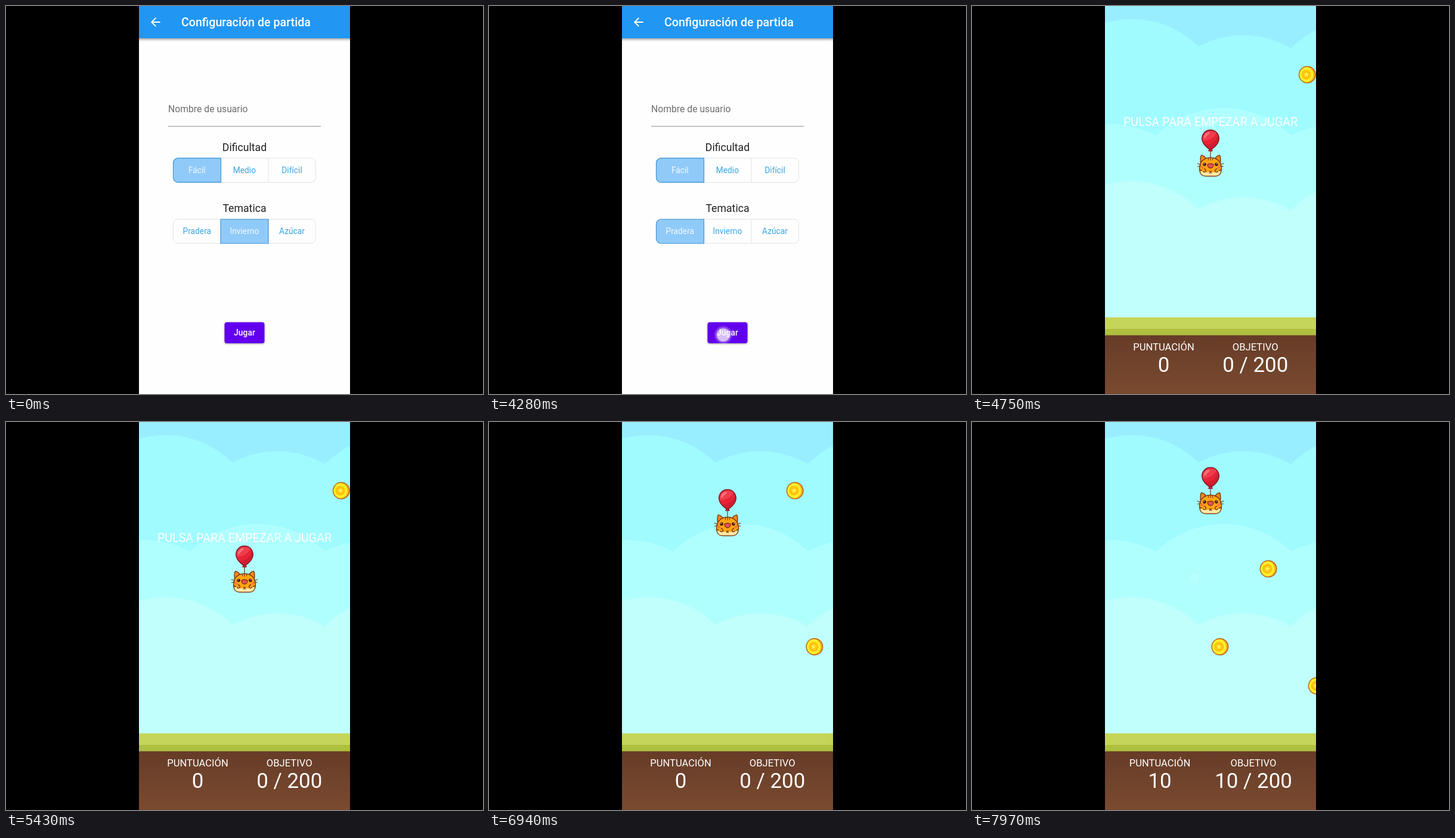
An HTML page for the animation above (8 s loop, 800x650 px).

```html
<!DOCTYPE html>
<html lang="es">
<head>
<meta charset="utf-8">
<style>
  html, body { margin: 0; width: 100%; height: 100%; overflow: hidden; background: #000; }
  svg { display: block; }
  text { font-family: Roboto, sans-serif; text-anchor: middle; }
  .body { font-size: 17.7px; fill: #212121; }
  .small { font-size: 13.77px; }
  .label { font-size: 16.6px; fill: #fff; }
  .score { font-size: 34.9px; fill: #fff; }
</style>
</head>
<body>
<svg id="stage" width="100%" height="100%" viewBox="0 0 800 650"></svg>
<script>
const LOOP = 8000;
const CX = 400, CY = 325;

const text = (s, x, y, attrs = '') => `<text x="${x}" y="${y}" ${attrs}>${s}</text>`;
// Full-width band of the phone screen.
const band = (y, h, fill) => `<rect x="223" y="${y}" width="354" height="${h}" fill="${fill}"/>`;

// Segmented control: plain cells plus one highlight layer per cell.
function toggleRow(id, y, labels) {
  const h = 40.5, base = y + 25.2;
  const mid = i => 320.3 + i * 79.6;
  const cell = i => i
    ? `M360 ${y}h80v${h}h-80z`
    : `M288.5 ${y}H360.5v${h}H288.5a8 8 0 0 1-8-8v-${h - 16}a8 8 0 0 1 8-8z`;
  const plain = labels.map((s, i) => text(s, mid(i), base, 'class="small" fill="#3ba5e3"')).join('');
  const lit = labels.slice(0, 2).map((s, i) => `<g id="${id}${i}">
    <path d="${cell(i)}" fill="#90caf9" stroke="#3b92d4" stroke-width="1.1"/>
    ${text(s, mid(i), base, 'class="small" fill="#f2f9ff"')}</g>`).join('');
  return `<rect x="280.5" y="${y}" width="239" height="${h}" rx="8" fill="none" stroke="#e0e3e6"/>
    <path d="M360.5 ${y}v${h}M440 ${y}v${h}" stroke="#e0e3e6"/>${plain}${lit}`;
}

const menu = `
  ${band(0, 650, '#fefefe')}
  <rect x="213" y="-10" width="374" height="64" fill="#2196f3" style="filter:drop-shadow(0 2px 2px #0006)"/>
  <path d="M20 11H7.83l5.59-5.59L12 4l-8 8 8 8 1.41-1.41L7.83 13H20z" fill="#fff"
    transform="translate(238.9 15.2) scale(.983)"/>
  ${text('Configuración de partida', 402.4, 34.2, 'font-size="19.67" font-weight="500" fill="#fff"')}
  ${text('Nombre de usuario', 338.8, 177.6, 'font-size="15.73" fill="#6e6e6e"')}
  <path d="M272 201.5h256" stroke="#929292"/>
  ${text('Dificultad', 400, 242.7, 'class="body"')}
  ${toggleRow('level', 254.9, ['Fácil', 'Medio', 'Difícil'])}
  ${text('Tematica', 400, 344.9, 'class="body"')}
  ${toggleRow('theme', 357.2, ['Pradera', 'Invierno', 'Azúcar'])}
  <circle id="inkTheme" cx="318" cy="380" fill="#2196f3" clip-path="url(#themeClip)"/>
  <rect x="366.5" y="529.7" width="67" height="35.3" rx="4" fill="#6200ee"
    style="filter:drop-shadow(0 1.5px 1.5px #0006)"/>
  <circle id="inkPlay" cx="393" cy="551" fill="#fff" clip-path="url(#playClip)"/>
  ${text('Jugar', 400, 552.4, 'class="small" font-weight="500" letter-spacing=".1" fill="#fff"')}`;

// One cloud layer: overlapping discs over a filled base.
const clouds = (fill, r, base, peaks) => `<g fill="${fill}">
  ${peaks.map(([x, y]) => `<circle cx="${x}" cy="${y + r}" r="${r}"/>`).join('')}
  ${band(base, 560 - base, fill)}</g>`;
const wave = y => [[268, y], [455, y + 27], [648, y + 1]];

const scenery = `
  ${band(-60, 710, '#98eeff')}
  ${clouds('#a0fbff', 158, 76, wave(22))}
  ${clouds('#b0ffff', 162, 222, [[232, 198], [422, 171], [608, 199]])}
  ${clouds('#c1fffc', 158, 347, wave(293.7))}
  ${band(521.5, 21, '#c5d559')}
  ${band(541, 12, '#afbf3f')}
  ${band(551.6, 120, 'url(#soil)')}
  <g id="hint">${text('PULSA PARA EMPEZAR A JUGAR', 400, 200.6, 'font-size="19.67" fill="#fff"')}</g>
  <g id="left">${text('PUNTUACIÓN', 0, 577, 'class="label"')}${text('0', 0, 612.7, 'class="score" id="points"')}</g>
  <g id="right">${text('OBJETIVO', 0, 577, 'class="label"')}${text('0 / 200', 0, 612.7, 'class="score" id="goal"')}</g>`;

const star = Array.from({ length: 10 }, (_, i) => {
  const r = i % 2 ? 2.3 : 5, a = i * Math.PI / 5 - Math.PI / 2;
  return `${(-1.6 + r * Math.cos(a)).toFixed(1)},${(r * Math.sin(a)).toFixed(1)}`;
}).join(' ');
const coin = `
  <circle r="13.6" fill="#ffb81c" stroke="#c06d1a" stroke-width="1.8"/>
  <ellipse cx="-1.4" rx="11.4" ry="12.5" fill="#fff02c"/>
  <circle cx="-1.6" r="8.2" fill="#ffc40c"/>
  <polygon points="${star}" fill="#fff056"/>`;

// Left half of a symmetric detail and its mirror image.
const pair = s => `${s}<g transform="translate(800) scale(-1 1)">${s}</g>`;
const cat = `
  <path d="M400 243v11" stroke="#6b3528" stroke-width="1.2"/>
  <path d="M400 207.8c8.3 0 14.2 6.2 14.2 14.3 0 7.500-7 14.600-12.200 17.400h-4c-5.200-2.800-12.200-9.900-12.200-17.400 0-8.100 5.900-14.300 14.200-14.300z"
    fill="#e62436" stroke="#7d1420" stroke-width="1.5"/>
  <path d="M387 226c-2-9 5-17 13-17 5 0 8 1.500 10 4-4 8-12 12-23 13z" fill="#f03c4c"/>
  <path d="M412.500 217c2 9-4 17-11 21.500h-3c-3-1.500-5-3.500-7-6 10 1 18-6 21-15.500z" fill="#d21d30"/>
  <path d="M389 221c0-6 4-9.500 9-10 2 4-3 5-5 8-1 2-3 4-4 2z" fill="#ff6d78"/>
  <path d="M398 239.500h4l1.300 3.500h-6.600z" fill="#d41f30" stroke="#7d1420"/>
  <g stroke="#7c3510" stroke-width="1.4" stroke-linejoin="round" stroke-linecap="round" fill="none">
    ${pair('<path d="M383.500 263c-.6-5-.4-10 1-13 4 .5 6.500 3 8.500 6.500z" fill="#f08a1c"/>')}
    <path d="M381.600 272c0-10.500 7-18 18.400-18s18.400 7.500 18.400 18c0 9.500-4.500 13-11 13h-14.800c-6.500 0-11-3.500-11-13z" fill="#ffa514"/>
    <path d="M383 277c5-1.500 8 .5 10 1.500h14c2-1 5-3 10-1.500-1 5.500-4.500 7.300-9.500 7.300h-15c-5 0-8.500-1.800-9.500-7.300z" fill="#ffe9a6" stroke="none"/>
    ${pair(`<path d="M382 274.500l3.500 1M389.500 272.500q4 2 2.500 5-2.500 1.800-4.500-.5"/>
      <path d="M378 264l6 1.500M378.500 269l5.500-1M396.500 255.500v2.500" stroke-width="1.100"/>`)}
    <path d="M400 255v3.500" stroke-width="1.100"/>
    <path d="M395 265.500q5-3 10 0c0 8-10 8-10 0z" fill="#e8505f"/>
    <path d="M398.500 276.800l3 3M401.500 276.800l-3 3"/>
  </g>
  ${pair(`<circle cx="386.200" cy="270.500" r="2.300" fill="#ff7440"/>
    <circle cx="390" cy="265.300" r="2.800" fill="#4b1a12"/>
    <circle cx="389.300" cy="264.300" r=".8" fill="#fff"/>`)}`;

// x at time t0, height on screen, time it is collected
const PLAY = 6552, SPEED = 0.1262, SCORED = 7740;
const coins = [
  { x: 562.3, y: 115, t0: PLAY, end: SCORED },
  { x: 546, y: 376.5, t0: 6940 },
  { x: 497.2, y: 246, t0: 7970 },
  { x: 578.3, y: 442, t0: 7970 }
];

document.getElementById('stage').innerHTML = `
  <defs>
    <linearGradient id="soil" x2="0" y2="1"><stop stop-color="#663c28"/><stop offset=".82" stop-color="#7a4a2f"/></linearGradient>
    <radialGradient id="glow"><stop offset=".6" stop-color="#fff" stop-opacity="0"/>
      <stop offset=".66" stop-color="#fff" stop-opacity=".45"/><stop offset="1" stop-color="#fff" stop-opacity="0"/></radialGradient>
    <clipPath id="themeClip"><rect x="281" y="357.7" width="79" height="39.5" rx="7"/></clipPath>
    <clipPath id="playClip"><rect x="366.5" y="529.7" width="67" height="35.3" rx="4"/></clipPath>
  </defs>
  <rect width="800" height="650"/>
  <svg x="223" width="354" height="650" viewBox="223 0 354 650">
    <g id="menu">${menu}</g>
    <rect id="scrim" x="223" width="354" height="650"/>
    <g id="game">
      ${band(-60, 770, '#fefefe')}
      <g id="scenery">${scenery}</g>
      ${coins.map((_, i) => `<g id="coin${i}">${coin}</g>`).join('')}
      <g id="cat">${cat}</g>
    </g>
    <g id="touch">
      <g id="disc"><circle r="16" fill="url(#glow)"/><circle r="10.8" fill="#fff" fill-opacity=".75"/></g>
      <circle r="10.8" fill="none" stroke="#000" stroke-opacity=".13"/>
    </g>
  </svg>`;

const el = {};
document.querySelectorAll('[id]').forEach(e => el[e.id] = e);
const set = (e, name, v) => e.setAttribute(name, v);
const show = (e, on) => set(e, 'display', on ? 'inline' : 'none');
const span = (t, a, b) => Math.min(1, Math.max(0, (t - a) / (b - a)));
const zoomAt = s => `translate(${CX} ${CY}) scale(${s}) translate(${-CX} ${-CY})`;

// Two joined cubics: a quick start with a very slow finish.
const cubic = (u, a, b, c, d) => {
  const v = 1 - u;
  return v * v * v * a + 3 * v * v * u * b + 3 * v * u * u * c + u * u * u * d;
};
function slowFinish(t) {
  const [xs, ys] = t < 1 / 6
    ? [[0, .05, .1333, 1 / 6], [0, 0, .06, .4]]
    : [[1 / 6, .2083, .25, 1], [.4, .82, 1, 1]];
  let lo = 0, hi = 1;
  for (let i = 0; i < 24; i++) {
    const m = (lo + hi) / 2;
    if (cubic(m, ...xs) < t) lo = m; else hi = m;
  }
  return cubic(lo, ...ys);
}

// Height above the resting place under jump speed and gravity.
const JUMP = 361, GRAVITY = 608, SECOND = 7612;
const hop = ms => JUMP * ms / 1000 - GRAVITY / 2 * (ms / 1000) ** 2;
function lift(t) {
  if (t < PLAY) return 0;
  return t < SECOND ? hop(t - PLAY) : hop(SECOND - PLAY) + hop(t - SECOND);
}

const touches = [
  { x: 318, y: 380, down: 500, up: 620 },
  { x: 393, y: 551, down: 4280, up: 4410 },
  { x: 372, y: 261, down: 6420, up: 6540 },
  { x: 372, y: 261, down: 7590, up: 7700 }
];
const FADE = 380;

function ink(e, t, { down, up }, reach, strength) {
  set(e, 'r', reach * Math.sqrt(span(t, down, up + 150)));
  set(e, 'opacity', strength * span(t, down, down + 75) * (1 - span(t, up, up + 400)));
}

function draw(t) {
  const pick = span(t, 620, 820);
  set(el.theme0, 'opacity', pick);
  set(el.theme1, 'opacity', 1 - pick);
  show(el.level1, false);
  ink(el.inkTheme, t, touches[0], 70, .14);
  ink(el.inkPlay, t, touches[1], 50, .24);

  const p = span(t, 4476, 4776), z = slowFinish(p);
  show(el.menu, p < 1);
  set(el.menu, 'transform', zoomAt(1 + .05 * z));
  set(el.scrim, 'opacity', p < 1 ? .6 * span(p, .2075, .4175) : 0);
  set(el.game, 'transform', zoomAt(.85 + .15 * z));
  set(el.game, 'opacity', span(p, .125, .25));
  show(el.scenery, t >= 4640);
  show(el.hint, t < PLAY);

  const scored = t >= SCORED;
  el.points.textContent = scored ? '10' : '0';
  el.goal.textContent = scored ? '10 / 200' : '0 / 200';
  set(el.left, 'transform', `translate(${scored ? 315 : 321.5})`);
  set(el.right, 'transform', `translate(${scored ? 472 : 475.2})`);

  set(el.cat, 'transform', `translate(0 ${-lift(t)})`);
  coins.forEach((c, i) => {
    const x = c.x - SPEED * (Math.max(t, PLAY) - c.t0);
    set(el['coin' + i], 'transform', `translate(${x} ${c.y})`);
    show(el['coin' + i], x < 593 && !(t >= c.end));
  });

  const now = touches.find(f => t >= f.down && t < f.up + FADE);
  show(el.touch, now);
  if (now) {
    const fade = 1 - span(t, now.up, now.up + FADE);
    set(el.touch, 'transform', `translate(${now.x} ${now.y})`);
    set(el.touch, 'opacity', fade);
    set(el.disc, 'opacity', fade);
  }
}

const start = performance.now();
function tick() {
  draw((performance.now() - start) % LOOP);
  requestAnimationFrame(tick);
}
tick();
</script>
</body>
</html>
```
